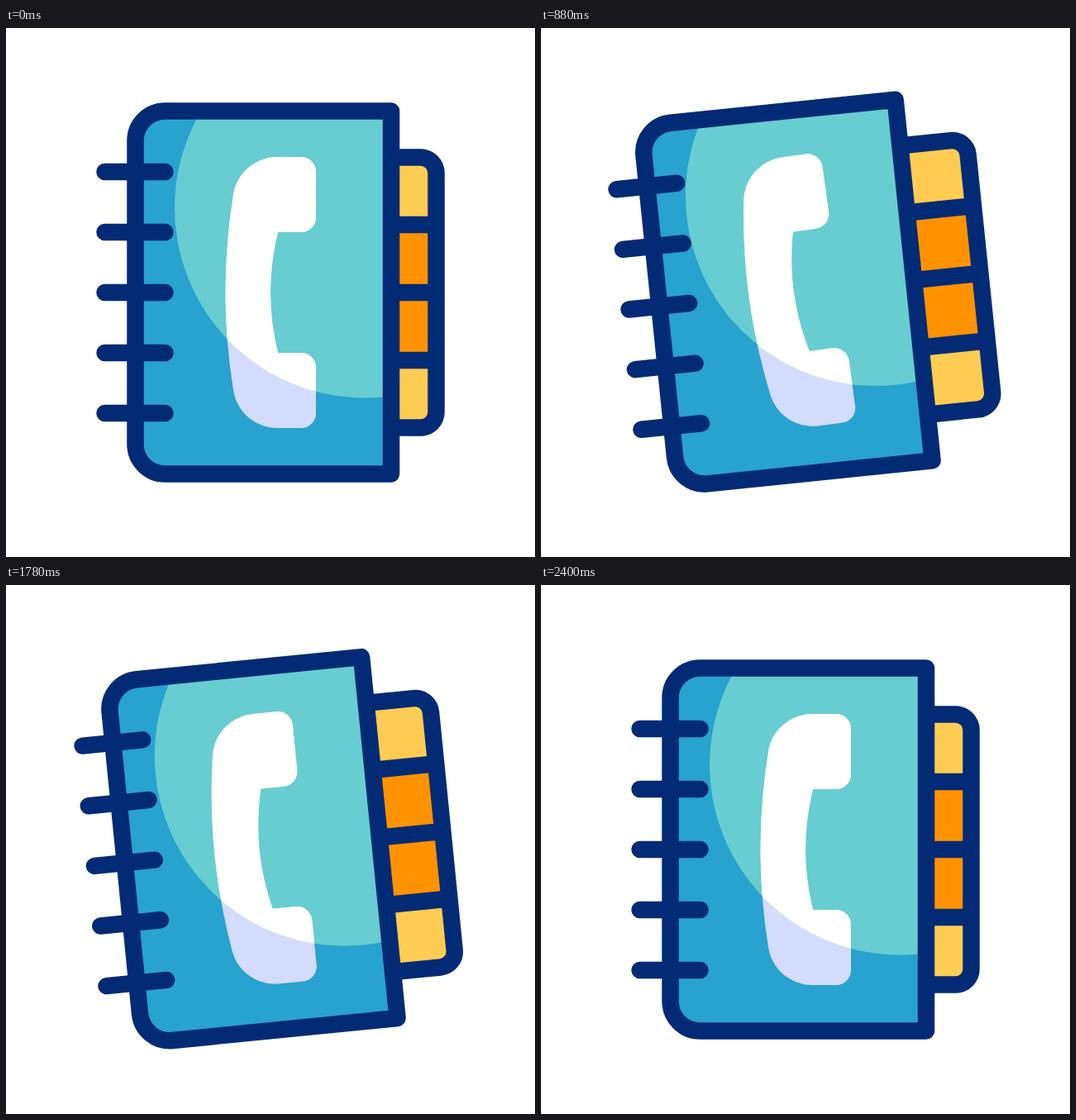
Write an HTML page that moves like this. It is 640x640 px and loops after 2.7 s.

```html
<!DOCTYPE html>
<html lang="en">
<head>
<meta charset="utf-8">
<title>Phone book</title>
<style>
  html, body { margin: 0; height: 100%; overflow: hidden; background: #fff; }
  svg { display: block; width: 100%; height: 100%; }
  .line { fill: none; stroke: #032b75; stroke-width: 20.5; stroke-linejoin: round; }
</style>
</head>
<body>
<svg viewBox="0 0 640 640">
  <defs>
    <path id="cover" d="M466 100.5H192.5a36 36 0 0 0-36 36V503.500a36 36 0 0 0 36 36H466Z"/>
    <path id="phone" d="M329 156H357a18 18 0 0 1 18 18V229a18 18 0 0 1-18 18H329Q311 320 329 393H357a18 18 0 0 1 18 18V466a18 18 0 0 1-18 18H329C302 484 279 465 275 438Q256 320 275 202C279 175 302 156 329 156Z"/>
    <circle id="shine" cx="434" cy="217.500" r="230"/>
    <clipPath id="inCover"><use href="#cover"/></clipPath>
    <clipPath id="inShine"><use href="#shine"/></clipPath>
  </defs>
  <g id="book">
    <g id="tabs">
      <path fill="#ffcc53" d="M420 156.500H501.500a19 19 0 0 1 19 19V464.500a19 19 0 0 1-19 19H420Z"/>
      <path fill="#ff9200" d="M420 238H520V402H420Z"/>
      <path class="line" d="M420 156.500H501.500a19 19 0 0 1 19 19V464.500a19 19 0 0 1-19 19H420M420 238H520M420 320H520M420 402H520"/>
    </g>
    <use href="#cover" fill="#28a2ce"/>
    <g clip-path="url(#inCover)">
      <g id="face">
        <use href="#shine" fill="#67cdd1"/>
        <use href="#phone" fill="#d3dcfd"/>
        <use href="#phone" fill="#fff" clip-path="url(#inShine)"/>
      </g>
    </g>
    <use href="#cover" class="line"/>
    <path class="line" stroke-linecap="round" d="M119.500 174H192.500M119.500 247H192.500M119.500 320H192.500M119.500 393H192.500M119.500 466H192.500"/>
  </g>
</svg>
<script>
  const LOOP = 2700;
  const [book, tabs, face] = ['book', 'tabs', 'face'].map(id => document.getElementById(id));

  // Progress from start to end on a cubic-bezier(x1, 0, x2, 1) curve
  function ease(time, start, end, x1, x2) {
    const s = (time - start) / (end - start);
    if (s <= 0) return 0;
    if (s >= 1) return 1;
    let low = 0, high = 1;
    for (let i = 0; i < 24; i++) {
      const u = (low + high) / 2, v = 1 - u;
      if (3 * x1 * u * v * v + 3 * x2 * u * u * v + u ** 3 < s) low = u;
      else high = u;
    }
    return low * low * (3 - 2 * low);
  }

  function ring(time) {
    if (time < 700 || time > 1600) return 0;
    return 3.15 * Math.sin((time - 700) / 300 * 2 * Math.PI);
  }

  function draw(now) {
    const time = now % LOOP;
    const back = ease(time, 1694, 2387, 0.4, 0);
    const tilt = 6 * (ease(time, 30, 1073, 0.4, 0.2) - back);
    const shift = 14.2 * (ease(time, 30, 971, 0.33, 0.2) - back);
    const slide = 37 * (ease(time, 57, 1397, 0.7, 0.4) - ease(time, 1517, 2256, 0.4, 0.35));

    book.setAttribute('transform', `translate(${-shift} 0) rotate(${-tilt} 320 320)`);
    tabs.setAttribute('transform', `translate(${slide} 0)`);
    face.setAttribute('transform', `rotate(${ring(time)} 320 320)`);
  }

  const begin = performance.now();
  function tick() {
    draw(performance.now() - begin);
    requestAnimationFrame(tick);
  }
  tick();
</script>
</body>
</html>
```
